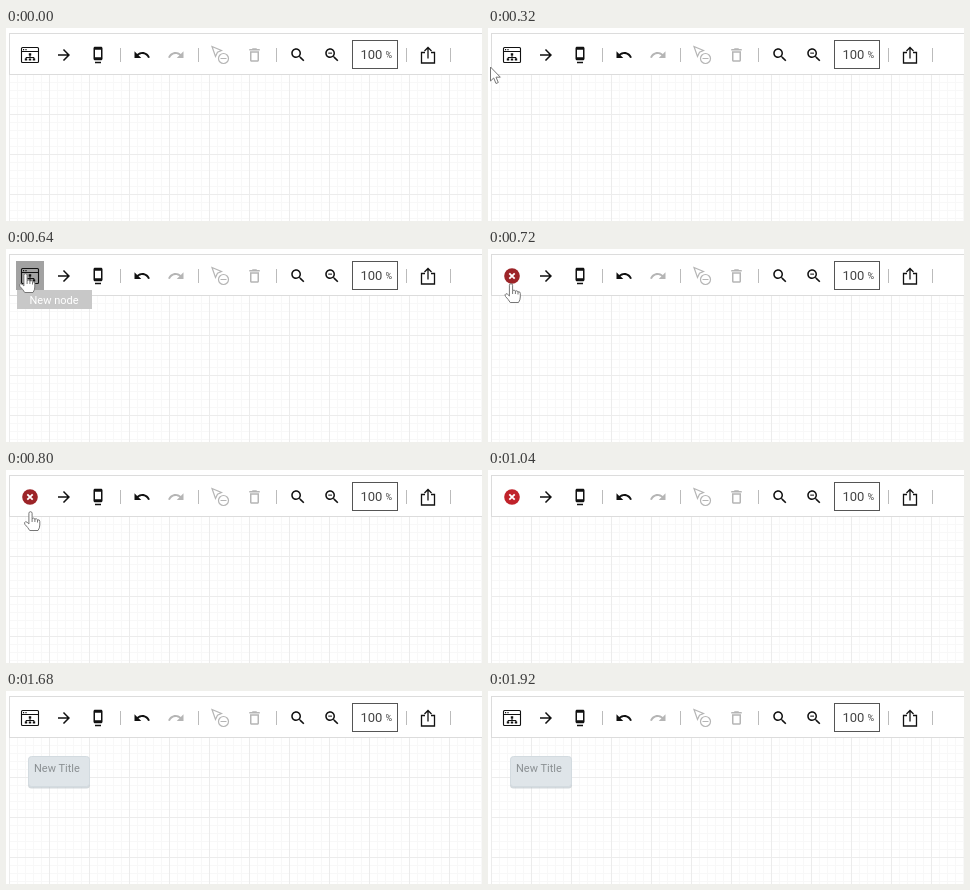
These frames come from a looping animation (476x193 px, 2320 ms). An HTML page:

```html
<!DOCTYPE html>
<html lang="en">
<head>
<meta charset="utf-8">
<title>Diagram toolbar</title>
<style>
  html, body { margin: 0; width: 100%; height: 100%; overflow: hidden; background: #fff; }
  svg { display: block; width: 476px; height: 193px; font-family: Roboto, sans-serif; }
  .line { fill: none; stroke: #111; stroke-width: 1.3; }
  .off { fill: #b5b5b5; }
  .off.line { fill: none; stroke: #b5b5b5; stroke-width: 1.2; }
  .crisp { shape-rendering: crispEdges; }
  .pointer { fill: #fff; stroke: #777; stroke-width: 1; stroke-linejoin: round; }
</style>
</head>
<body>
<svg viewBox="0 0 476 193">
  <defs>
    <pattern id="minor" x="3" y="46" width="8" height="8" patternUnits="userSpaceOnUse">
      <path d="M.5 0V8M0 .5H8" stroke="#f8f8f8"/>
    </pattern>
    <pattern id="major" x="3" y="46" width="40" height="40" patternUnits="userSpaceOnUse">
      <path d="M.5 0V40M0 .5H40" stroke="#ececec"/>
    </pattern>
    <path id="undoShape" d="M12.5 8c-2.65 0-5.05.99-6.9 2.6L2 7v9h9l-3.62-3.62c1.39-1.16 3.16-1.88 5.12-1.88 3.54 0 6.55 2.31 7.6 5.5l2.37-.78C21.08 11.03 17.15 8 12.5 8z"/>
    <path id="lens" d="M15.5 14h-.79l-.28-.27C15.41 12.59 16 11.11 16 9.5 16 5.91 13.09 3 9.5 3S3 5.91 3 9.5 5.91 16 9.5 16c1.61 0 3.09-.59 4.23-1.57l.27.28v.79l5 4.99L20.49 19l-4.99-5zm-6 0C7.01 14 5 11.99 5 9.5S7.01 5 9.5 5 14 7.01 14 9.5 11.99 14 9.5 14z"/>
  </defs>

  <rect x="3" y="46" width="473" height="147" fill="url(#minor)"/>
  <rect x="3" y="46" width="473" height="147" fill="url(#major)"/>
  <path class="crisp" d="M480 5.5H3.5V46.5H480" fill="#fff" stroke="#dcdcdc"/>

  <rect id="hover" x="10" y="12" width="28" height="29"/>
  <g id="nodeIcon">
    <rect class="line" x="15.5" y="19.5" width="17" height="15" rx="1" style="stroke-width:1.1"/>
    <path class="line" d="M15.5 23.5H32.5M24 27V30M20 31V29.5H28V31" style="stroke-width:1"/>
    <path d="M17 21h1.2v1.2h-1.2zM19.4 21h1.2v1.2h-1.2zM22.8 25.3h2.4v2.2h-2.4zM18.8 30.4h2.4v2.2h-2.4zM22.8 30.4h2.4v2.2h-2.4zM26.8 30.4h2.4v2.2h-2.4z" fill="#111"/>
  </g>
  <g id="cancelIcon">
    <circle cx="24" cy="27" r="7.8"/>
    <path d="M21.3 24.3L26.7 29.7M26.7 24.3L21.3 29.7" stroke="#fff" stroke-width="1.8"/>
  </g>

  <g fill="#111">
    <path transform="translate(49 18) scale(.75)" d="M12 4l-1.41 1.41L16.17 11H4v2h12.17l-5.58 5.59L12 20l8-8z"/>
    <path transform="translate(83 18) scale(.75)" d="M8 23h8v-2H8v2zm8-22H8c-1.1 0-2 .9-2 2v14c0 1.1.9 2 2 2h8c1.1 0 2-.9 2-2V3c0-1.1-.9-2-2-2zm0 14H8V5h8v10z"/>
    <use href="#undoShape" transform="translate(127 18) scale(.75)"/>
    <use href="#undoShape" class="off" transform="translate(179 18) scale(-.75 .75)"/>
    <path class="off" transform="translate(239.5 18) scale(.75)" d="M6 19c0 1.1.9 2 2 2h8c1.1 0 2-.9 2-2V7H6v12zM8 9h8v10H8V9zm7.5-5l-1-1h-5l-1 1H5v2h14V4h-3.5z"/>
    <use href="#lens" transform="translate(283 18) scale(.75)"/>
    <g transform="translate(317 18) scale(.75)"><use href="#lens"/><path d="M7 8.8h5v1.4H7z"/></g>
  </g>
  <path class="off line" d="M206 18.5L215.5 22.5L211.5 24.2L209.5 28.5ZM214.5 30.5H220.5"/>
  <circle class="off line" cx="217.5" cy="30.5" r="5"/>
  <path class="crisp" d="M114.5 20V34M192.5 20V34M270.5 20V34M400.5 20V34M444.5 20V34" stroke="#bbb"/>
  <rect class="crisp" x="346.5" y="12.5" width="45" height="28" fill="#fff" stroke="#555"/>
  <text x="354.5" y="31" font-size="13" fill="#444">100</text>
  <text x="379.5" y="30" font-size="9" fill="#444">%</text>
  <path class="line" d="M419 24.5H415.5V35H428.5V24.5H425M422 30.5V19.5M418.5 23L422 19.5L425.5 23"/>

  <g id="card">
    <rect x="22" y="66.5" width="62" height="31" rx="3.5" fill="#bcc5cb" opacity=".65"/>
    <rect x="22.5" y="65.5" width="61" height="30" rx="3" fill="#dfe5e9" stroke="#d3dbe0"/>
    <text x="28" y="81" font-size="11" fill="#8b9093">New Title</text>
  </g>
  <g id="tooltip">
    <rect x="11" y="41" width="75" height="19" fill="#c8c8c8"/>
    <text x="23.5" y="55" font-size="11" fill="#fff">New node</text>
  </g>
  <path id="arrow" class="pointer" d="M.5 0V14L3.7 11L6 16.5L8.3 15.5L6 10.2H10.3Z"/>
  <path id="hand" class="pointer" d="M-1.6 12V1.2Q-1.5-.3 0-.3T1.6 1.2V6.5Q3.3 5.5 4.4 7Q6.2 6.2 7 7.8Q9.3 7.3 9.3 9.5V13Q9.3 16 7.5 18.5H-.8Q-2.5 15.5-5.5 12.5Q-6.8 10.5-5 9.7Q-3.5 9.6-1.6 12ZM1.6 6.5V10M4.4 7V10M7 7.8V10.5"/>
</svg>
<script>
  const LOOP = 2320;
  const RED = '#c0222a', DARK_RED = '#9c2428';
  const el = id => document.getElementById(id);

  // Each pose holds until the next one begins.
  const poses = [
    { at: 0 },
    { at: 80, arrow: [83, 107] },
    { at: 160, arrow: [-1, 19] },
    { at: 320, arrow: [2, 39] },
    { at: 400, arrow: [9, 35] },
    { at: 480, hand: [18, 29], hover: '#ddd' },
    { at: 560, hand: [19, 26], hover: '#b4b4b4', tooltip: true },
    { at: 640, hand: [19.5, 25], hover: '#a2a2a2', tooltip: true },
    { at: 720, hand: [23, 35], cancel: DARK_RED },
    { at: 800, hand: [24.5, 42], cancel: DARK_RED },
    { at: 880, hand: [25, 46], cancel: DARK_RED },
    { at: 960, cancel: RED },
    { at: 1520, card: true }
  ];

  function show(id, visible) {
    el(id).style.display = visible ? '' : 'none';
  }

  function place(id, point) {
    show(id, point);
    if (point) el(id).setAttribute('transform', `translate(${point})`);
  }

  function draw() {
    const time = performance.now() % LOOP;
    const pose = poses.findLast(p => p.at <= time);
    place('arrow', pose.arrow);
    place('hand', pose.hand);
    el('hover').setAttribute('fill', pose.hover || 'none');
    el('cancelIcon').setAttribute('fill', pose.cancel || 'none');
    show('cancelIcon', pose.cancel);
    show('nodeIcon', !pose.cancel);
    show('tooltip', pose.tooltip);
    show('card', pose.card);
    requestAnimationFrame(draw);
  }
  draw();
</script>
</body>
</html>
```
